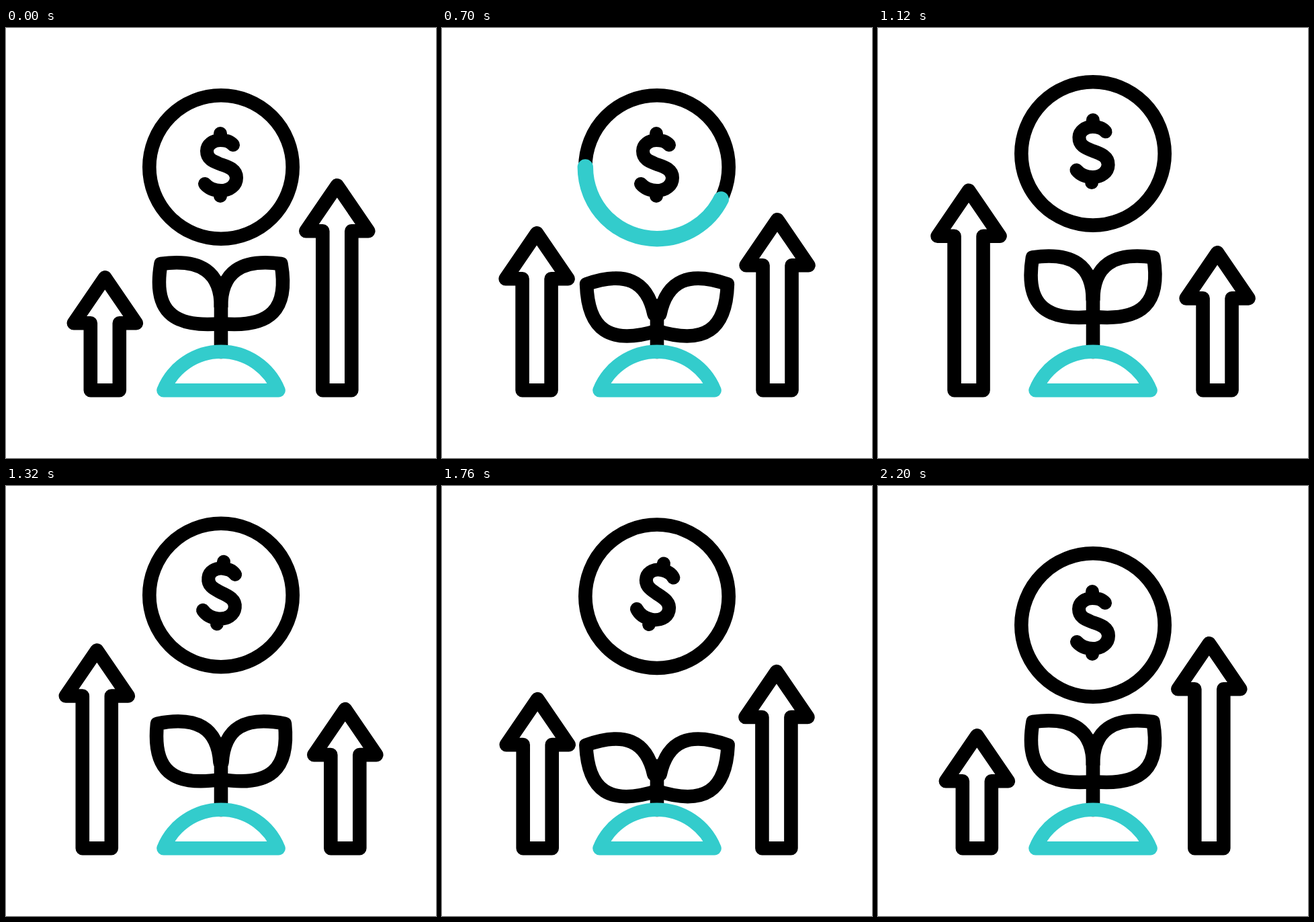
Recreate the animation shown at these times as an HTML page. Size 640x640 px, loop 2.4 s.

```html
<!DOCTYPE html>
<html lang="en">
<head>
<meta charset="utf-8">
<title>Growth</title>
<style>
  html, body { margin: 0; width: 100%; height: 100%; overflow: hidden; background: #fff; }
  svg { display: block; width: 100vw; height: 100vh; }
</style>
</head>
<body>
<svg viewBox="0 0 640 640" fill="none" stroke="#000" stroke-width="20.6" stroke-linecap="round" stroke-linejoin="round">
  <path id="left"/>
  <path id="right"/>
  <path id="stem"/>
  <defs>
    <path id="leaf" d="M320 440C245 447 219 418 230.5 351C290 343 320 363 320 415"/>
  </defs>
  <g id="leaves">
    <use href="#leaf" class="blade"/>
    <g transform="matrix(-1 0 0 1 640 0)"><use href="#leaf" class="blade"/></g>
  </g>
  <path d="M234.5 539.3A92.3 92.3 0 0 1 405.5 539.3Z" stroke="#3cc"/>
  <g id="coin">
    <circle cx="320" cy="207" r="106.7"/>
    <path id="glow" pathLength="360" stroke="#3cc" stroke-width="23.4"
      d="M426.7 207A106.7 106.7 0 0 0 213.3 207A106.7 106.7 0 0 0 426.7 207"/>
    <path id="dollar" stroke-width="20" d="M338 174C333 168 327 167 319 167C308 167 299 174 299 183
      C299 196 310 199 320 203C332 207 343 211 343 223C343 234 333 242 320 242C309 242 301 238 296 232
      M319 157V167M319 250V242"/>
  </g>
</svg>
<script>
const LOOP = 2400, STEP = 20;
const $ = id => document.getElementById(id);
const set = (el, name, value) => el.setAttribute(name, value);

// Eased value at time t through keys [time, value]
function tween(t, ...keys) {
  if (t <= keys[0][0]) return keys[0][1];
  for (let i = 1; i < keys.length; i++) {
    const [t0, a] = keys[i - 1], [t1, b] = keys[i];
    if (t < t1) {
      const u = (t - t0) / (t1 - t0);
      return a + (b - a) * u * u * (3 - 2 * u);
    }
  }
  return keys[keys.length - 1][1];
}

// Arrow on the ground line, x is its axis and y its tip
function arrow(x, y) {
  const base = y + 68;
  return `M${x - 21.5} 539.3V${base}H${x - 46.5}L${x} ${y}L${x + 46.5} ${base}H${x + 21.5}V539.3Z`;
}

function draw(t) {
  const swap = tween(t, [200, 0], [1200, 1], [2200, 0]);
  set($('left'), 'd', arrow(147.3 - 12.5 * swap, 371.3 - 132 * swap));
  set($('right'), 'd', arrow(492.8 + 12.5 * swap, 234.2 + 102 * swap));

  const tilt = tween(t, [200, 0], [640, 12.3], [1040, 0], [1800, 12.3], [2200, 0]);
  const sink = tween(t, [200, 0], [640, 12], [1040, -11], [1800, 14], [2200, 0]);
  for (const blade of document.querySelectorAll('.blade'))
    set(blade, 'transform', `rotate(${-tilt} 320 437)`);
  set($('leaves'), 'transform', `translate(0 ${sink})`);
  set($('stem'), 'd', `M320 ${403 + sink}V482`);

  const lift = tween(t, [980, 0], [1280, -44.5], [1700, -44.5], [2200, 0]);
  const turn = tween(t, [1000, 0], [1700, 14.2], [2200, 0]);
  set($('coin'), 'transform', `translate(0 ${lift})`);
  set($('dollar'), 'transform', `rotate(${turn} 319 203.5)`);

  const head = tween(t, [200, 0], [800, 360]);
  const tail = tween(t, [400, 0], [1000, 360]);
  const glow = $('glow');
  set(glow, 'visibility', head > tail ? 'visible' : 'hidden');
  set(glow, 'stroke-dasharray', `${head - tail} 720`);
  set(glow, 'stroke-dashoffset', -tail);
}

const start = performance.now();
function frame() {
  const t = (performance.now() - start) % LOOP;
  draw(Math.floor(t / STEP) * STEP);
  requestAnimationFrame(frame);
}
frame();
</script>
</body>
</html>
```
